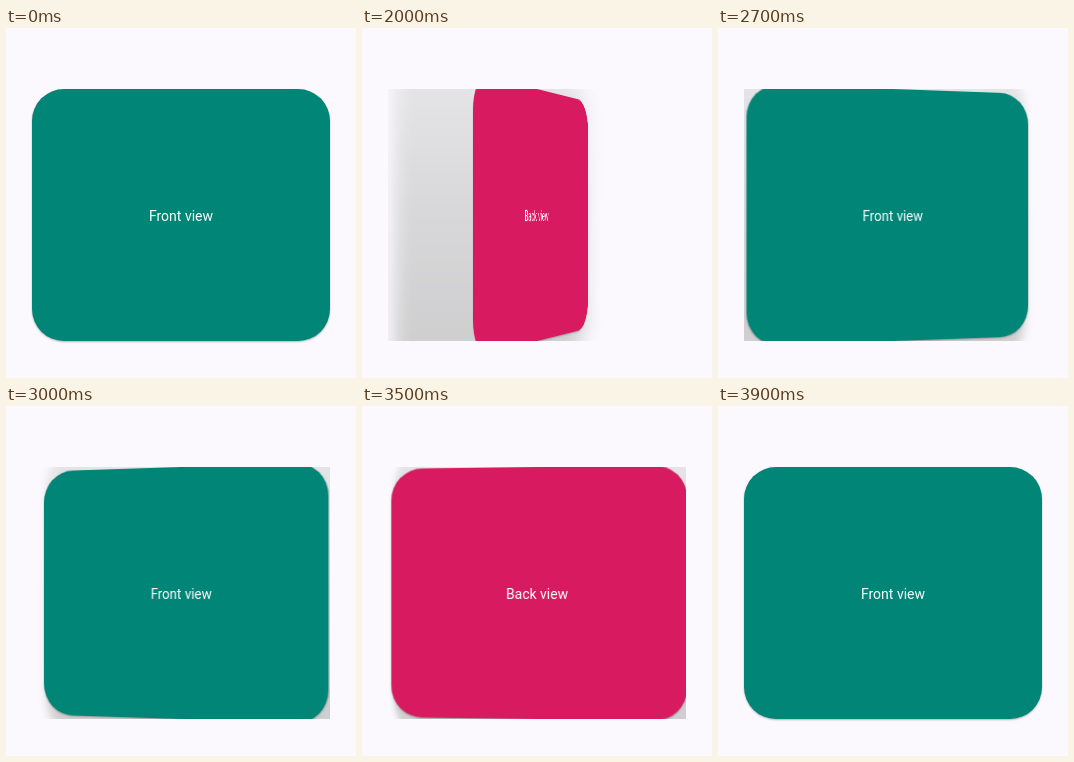
An HTML page that plays this animation: 350x350 px, repeating every 4000 ms.

```html
<!DOCTYPE html>
<html lang="en">
<head>
<meta charset="utf-8">
<title>Card flip</title>
<style>
  html, body { margin: 0; width: 100%; height: 100%; overflow: hidden; background: #fbf9fe; }
  #scene {
    position: absolute; left: 26px; top: 61px; width: 298px; height: 252px;
    perspective: 1225px;
  }
  #scene.turning { overflow: hidden; }
  #shade {
    position: absolute; top: -24px; bottom: -24px;
    background: linear-gradient(#e4e3e6 10%, #d9d9db 45%, #cfcfd0 90%);
  }
  #card {
    position: absolute; inset: 0; border-radius: 32px;
    box-shadow: 0 1px 2px rgba(0, 0, 0, .28);
    color: #fff; font: 14px/254px Roboto, sans-serif; text-align: center;
  }
</style>
</head>
<body>
<div id="scene">
  <div id="shade"></div>
  <div id="card"></div>
</div>
<script>
const LOOP = 4000, STEP = 100, TURN = 400;
const HALF = 149, DEPTH = 1225;
const STARTS = [1768, 2385, 2919, 3449];
const FACES = [
  { text: 'Front view', color: '#008577' },
  { text: 'Back view', color: '#d81b60' }
];
const [scene, shade, card] = ['scene', 'shade', 'card'].map(id => document.getElementById(id));

const ease = t => (1 - Math.cos(Math.PI * t)) / 2;

// Half turns completed so far, including the running one
function turnsAt(time) {
  return STARTS.reduce((sum, start) =>
    sum + ease(Math.min(1, Math.max(0, (time - start) / TURN))), 0);
}

function drawShade(angle) {
  const rad = Math.abs(angle) * Math.PI / 180;
  const sin = Math.sin(rad), width = HALF * Math.cos(rad);
  const depth = HALF * sin / DEPTH;
  const far = HALF - width / (1 + depth);
  const near = HALF - width / (1 - depth) - 14 - 70 * sin;
  const leftFar = angle < 0;
  shade.style.left = (leftFar ? far + 3 : near) + 'px';
  shade.style.right = (leftFar ? near : far + 3) + 'px';
  shade.style.borderRadius = leftFar ? '44px 0 0 44px' : '0 44px 44px 0';
  shade.style.filter = `blur(${2 + 7 * sin}px)`;
}

function draw(time) {
  const turns = turnsAt(time);
  const shown = Math.round(turns);
  const angle = (shown - turns) * 180;
  const turning = Math.abs(angle) > 0.01;
  const face = FACES[shown % 2];
  scene.className = turning ? 'turning' : '';
  shade.style.display = turning ? 'block' : 'none';
  if (turning) drawShade(angle);
  if (card.textContent !== face.text) card.textContent = face.text;
  card.style.background = face.color;
  card.style.transform = turning ? `rotateY(${angle}deg)` : 'none';
}

const origin = performance.now();
function tick() {
  const time = (performance.now() - origin) % LOOP;
  draw(Math.floor(time / STEP) * STEP);
  requestAnimationFrame(tick);
}
tick();
</script>
</body>
</html>
```
